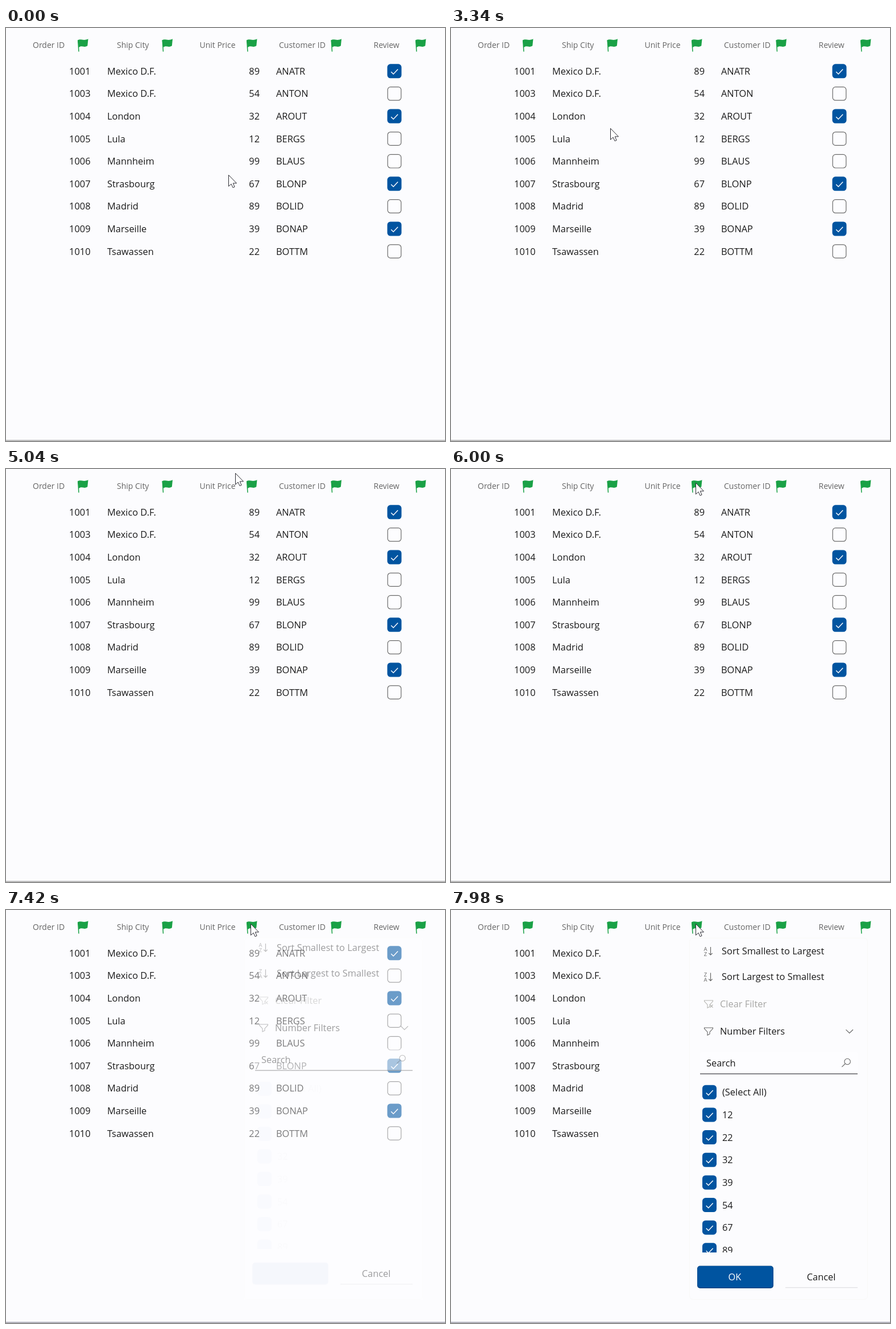
Animation of 772x726 px, one loop 8000 ms. Source, as an HTML page with a canvas:

```html
<!DOCTYPE html>
<html lang="en">
<head>
<meta charset="utf-8">
<title>Grid filter menu</title>
<style>
  html, body { margin: 0; width: 100%; height: 100%; overflow: hidden; background: #fcfcfe; }
  canvas { display: block; }
</style>
</head>
<body>
<canvas id="stage" width="772" height="726"></canvas>
<script>
const ctx = document.getElementById('stage').getContext('2d');
const LOOP = 8000;
const PAGE = '#fcfcfe', INK = '#1a1a1a', GRAY = '#666', BLUE = '#0054a0', GREEN = '#1aa146';

const headers = [['Order ID', 47], ['Ship City', 195], ['Unit Price', 340.5], ['Customer ID', 480], ['Review', 646.5]];
const rows = [
  [1001, 'Mexico D.F.', 89, 'ANATR', true],
  [1003, 'Mexico D.F.', 54, 'ANTON', false],
  [1004, 'London', 32, 'AROUT', true],
  [1005, 'Lula', 12, 'BERGS', false],
  [1006, 'Mannheim', 99, 'BLAUS', false],
  [1007, 'Strasbourg', 67, 'BLONP', true],
  [1008, 'Madrid', 89, 'BOLID', false],
  [1009, 'Marseille', 39, 'BONAP', true],
  [1010, 'Tsawassen', 22, 'BOTTM', false]
];
const choices = ['(Select All)', 12, 22, 32, 39, 54, 67, 89];

// time, x, y of the pointer tip; equal neighbours are pauses
const pointerPath = [
  [0, 391, 258], [3339, 391, 258], [3340, 280, 176], [3380, 280, 176],
  [3520, 274, 168], [3660, 274, 168], [3900, 270, 150], [4080, 270, 150],
  [4220, 267, 55], [4320, 267, 55], [4460, 275, 23], [4620, 275, 23],
  [4780, 385, 9], [4920, 385, 9], [5040, 403, 7], [5179, 403, 7],
  [5180, 406, 9], [5319, 406, 9], [5340, 411, 21], [5579, 411, 21],
  [5580, 421, 22], [5740, 421, 22], [6000, 430, 24], [LOOP, 430, 24]
];

const clamp01 = v => Math.max(0, Math.min(1, v));
const progress = (t, from, to) => clamp01((t - from) / (to - from));

function text(str, x, centerY, { size = 16.4, color = INK, align = 'left' } = {}) {
  ctx.font = `${size}px "Open Sans", "Noto Sans", sans-serif`;
  ctx.fillStyle = color;
  ctx.textAlign = align;
  ctx.fillText(str, x, centerY + size * 0.37);
}

function stroke(d, color, width = 1.2) {
  ctx.strokeStyle = color;
  ctx.lineWidth = width;
  ctx.stroke(new Path2D(d));
}

function at(x, y, draw) {
  ctx.save();
  ctx.translate(x, y);
  draw();
  ctx.restore();
}

function roundRect(x, y, w, h, r) {
  ctx.beginPath();
  ctx.roundRect(x, y, w, h, r);
}

function checkbox(x, y, checked) {
  at(x, y, () => {
    if (checked) {
      roundRect(-12.5, -12.5, 25, 25, 5.5);
      ctx.fillStyle = BLUE;
      ctx.fill();
      stroke('M-5.8 1.2L-1.8 5.2L6.2 -3.2', '#fff', 1.4);
    } else {
      roundRect(-11.8, -11.8, 23.6, 23.6, 5);
      ctx.fillStyle = '#fdfdff';
      ctx.fill();
      ctx.strokeStyle = '#6a6a6a';
      ctx.lineWidth = 1.2;
      ctx.stroke();
    }
  });
}

function flag(x) {
  at(x, 19, () => {
    ctx.fillStyle = GREEN;
    ctx.fill(new Path2D('M0 2.6C5 -1 10 4.5 18.5 0.3L17.3 12.3C11 16.5 7 10.5 2 15.2Z'));
    stroke('M0.7 2.5L2 22.5', GREEN, 1.5);
  });
}

function grid() {
  headers.forEach(([label, x], i) => {
    text(label, x, 30.3, { size: 14, color: GRAY });
    flag(126 + 148.5 * i);
  });
  rows.forEach(([id, city, price, customer, reviewed], i) => {
    const y = 75.8 + 39.6 * i;
    text(id, 148.5, y, { align: 'right' });
    text(city, 178, y);
    text(price, 446, y, { align: 'right' });
    text(customer, 475, y);
    checkbox(683, y, reviewed);
  });
}

function sortIcon(y, top, bottom) {
  text(top, 447.5, y - 4, { size: 9.5, color: GRAY, align: 'center' });
  text(bottom, 447.5, y + 5, { size: 9.5, color: GRAY, align: 'center' });
  at(456.5, y, () => stroke('M0 -7V7M-3.2 3.8L0 7L3.2 3.8', GRAY));
}

function filterIcon(y, color) {
  at(453, y, () => stroke('M-7.5 -6H7.5V-4.5L2 1.5V5L-2 7V1.5L-7.5 -4.5Z', color, 1.1));
}

function menu(alpha, listAlpha, shift) {
  ctx.save();
  ctx.globalAlpha = alpha;
  ctx.fillStyle = PAGE;
  ctx.fillRect(419, 49, 314, 636);
  roundRect(419.5, 49.5, 313, 635, 6);
  ctx.strokeStyle = '#f9f9f7';
  ctx.lineWidth = 1;
  ctx.stroke();
  ctx.translate(0, shift);

  sortIcon(72, 'A', 'Z');
  text('Sort Smallest to Largest', 476, 71.8);
  sortIcon(117.5, 'Z', 'A');
  text('Sort Largest to Smallest', 476, 117);
  filterIcon(165, '#b4b4b0');
  at(458, 169, () => stroke('M-2.5 -2.5L2.5 2.5M2.5 -2.5L-2.5 2.5', '#b4b4b0', 1.1));
  text('Clear Filter', 473, 164.8, { color: '#a6a6a4' });
  filterIcon(213, GRAY);
  text('Number Filters', 473, 212.7);
  stroke('M694.5 210.3L700.7 216.5L707 210.3', GRAY);

  roundRect(437.5, 249, 277.5, 40, 4);
  ctx.fillStyle = '#fdfdff';
  ctx.fill();
  stroke('M438 288H715', '#606064', 1.5);
  text('Search', 449, 268.7);
  stroke('M693 270.5L687.3 275.8M702.3 266.5A5.2 5.2 0 1 1 691.9 266.5A5.2 5.2 0 1 1 702.3 266.5', GRAY, 1.1);
  text('Cancel', 651, 645, { align: 'center' });
  stroke('M588 663.8H715', '#d9d9dd', 1);

  ctx.globalAlpha = alpha * listAlpha;
  roundRect(433, 625.5, 134, 39.5, 5);
  ctx.fillStyle = '#003f7c';
  ctx.fill();
  roundRect(433.5, 626, 133, 37.8, 5);
  ctx.fillStyle = BLUE;
  ctx.fill();
  text('OK', 499, 645, { color: '#fff', align: 'center' });

  ctx.beginPath();
  ctx.rect(433, 300, 285, 302);
  ctx.clip();
  choices.forEach((label, i) => {
    const y = 320.3 + 39.65 * i;
    checkbox(454.5, y, true);
    text(label, 477, y);
  });
  ctx.restore();
}

function pointer(t) {
  const next = Math.max(1, pointerPath.findIndex(key => key[0] > t));
  const [t0, x0, y0] = pointerPath[next - 1], [t1, x1, y1] = pointerPath[next];
  const p = progress(t, t0, t1);
  at(x0 + (x1 - x0) * p + 0.5, y0 + (y1 - y0) * p + 0.5, () => {
    const arrow = 'M0 0V19.8L4.6 15.6L7.6 22.2L10.6 20.8L7.8 14.4H14Z';
    ctx.fillStyle = '#fff';
    ctx.fill(new Path2D(arrow));
    stroke(arrow, '#2b2b33', 1);
  });
}

function draw(t) {
  ctx.globalAlpha = 1;
  ctx.fillStyle = PAGE;
  ctx.fillRect(0, 0, 772, 726);
  grid();

  const opacity = progress(t, 7370, 7490);
  if (opacity > 0) {
    const shift = -10 * (1 - progress(t, 7370, 7600)) ** 2;
    menu(opacity, progress(t, 7415, 7560), shift);
  }

  ctx.fillStyle = t < 6440 ? '#b4b4b4' : '#9c9cb0';
  ctx.fillRect(0, 724, 772, 1);
  ctx.fillStyle = '#c8c8c8';
  ctx.fillRect(0, 725, 772, 1);
  pointer(t);
}

function tick() {
  draw(performance.now() % LOOP);
  requestAnimationFrame(tick);
}
tick();
</script>
</body>
</html>
```
